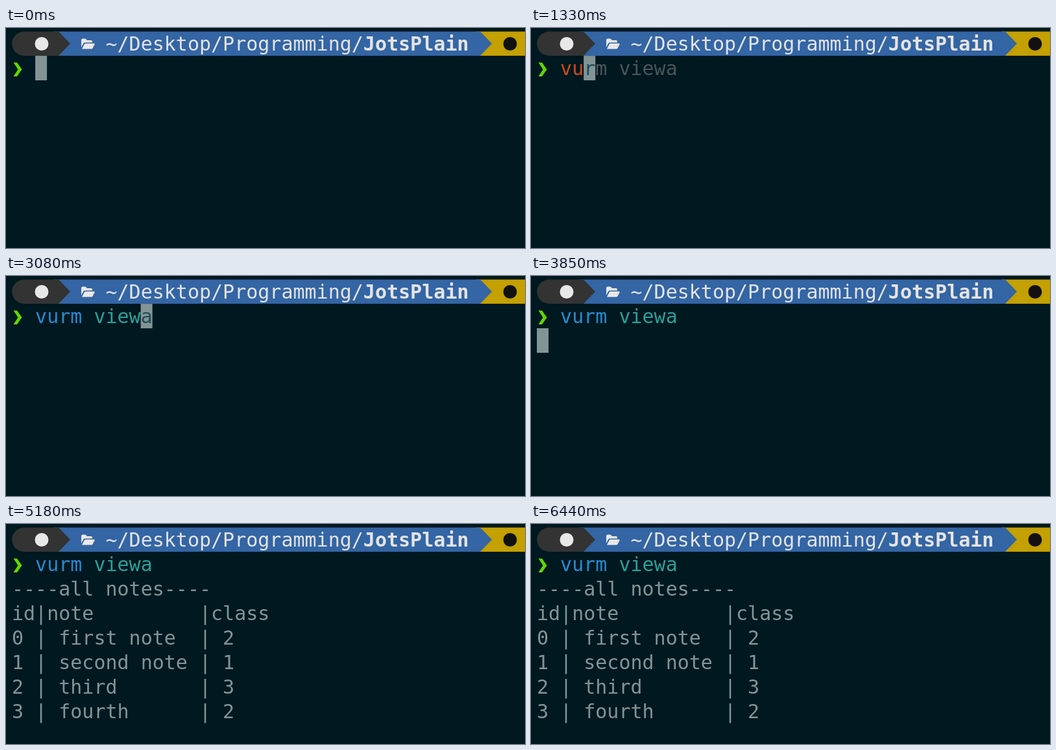
These frames come from a looping animation (800x341 px, 6.51 s). An HTML page:

```html
<!DOCTYPE html>
<html lang="en">
<head>
<meta charset="utf-8">
<title>Terminal notes</title>
<style>
  html, body { margin: 0; width: 100%; height: 100%; overflow: hidden; background: #001820; }
  svg { display: block; width: 800px; height: 341px; }
  text { font: 30px "DejaVu Sans Mono", monospace; white-space: pre; fill: #839496; }
  .path { fill: #e4e4e4; }
  .path tspan { font-weight: bold; }
  #arg { fill: #2aa198; }
  #under { fill: #1f4c57; }
  #hint { fill: #4b5557; }
</style>
</head>
<body>
<svg viewBox="0 0 800 341">
  <!-- prompt bar -->
  <path fill="#c4a000" d="M725 5.500H800V43H725Z"/>
  <path fill="#3465a4" d="M75 5.500H731L749 24.250L731 43H75Z"/>
  <path fill="#333" d="M28 5.500H81L99 24.250L81 43H28A18.750 18.750 0 0 1 28 5.500Z"/>
  <circle cx="55" cy="24.500" r="10.500" fill="#e8e8e8"/>
  <path fill="#e8e8e8" d="M116 30V18.500Q116 16.500 118 16.500H122.500L125 19H131Q133 19 133 21V22.500H122Q120 22.500 119 24ZM117 32.500L120.500 25.500Q121.200 24 122.500 24H136Q137.300 24 136.700 25.200L133.500 31.200Q132.800 32.500 131.500 32.500Z"/>
  <text class="path" x="153.500" y="35">~/Desktop/Programming/<tspan>JotsPlain</tspan></text>
  <circle cx="777" cy="24.500" r="10.500" fill="#111"/>

  <!-- command line -->
  <path fill="#5fd700" d="M11.500 53.500H17L24.500 64.300L17 75H11.500L18.500 64.300Z"/>
  <rect id="cursor" width="18" height="38" fill="#839496"/>
  <text x="45.100" y="73"><tspan id="cmd"></tspan><tspan id="arg"></tspan><tspan id="under"></tspan><tspan id="hint"></tspan></text>
  <g id="output"></g>
</svg>
<script>
const LOOP = 6510, CELL = 18.06, ROW = 37.9, LEFT = 9, TOP = 5.2;
const COMMAND = "vurm", LINE = COMMAND + " viewa";
const KEYS = [1050, 1260, 1540, 1750, 2030, 2310, 2520, 2730, 2940, 3220];
const ENTER = 3570, PRINT = 4130;
const NOTES = [["first note", 2], ["second note", 1], ["third", 3], ["fourth", 2]];

const $ = id => document.getElementById(id);
const [cursor, cmd, arg, under, hint, output] =
  ["cursor", "cmd", "arg", "under", "hint", "output"].map($);

const rows = [
  "----all notes----",
  "id|" + "note".padEnd(13) + "|class",
  ...NOTES.map(([note, kind], id) => `${id} | ${note.padEnd(12)}| ${kind}`)
];
output.innerHTML = rows.map((row, i) =>
  `<text x="${LEFT}" y="${35.2 + ROW * (i + 2)}">${row}</text>`).join("");

function draw(t) {
  const typed = KEYS.filter(key => t >= key).length;
  const entered = t >= ENTER, printed = t >= PRINT;
  const size = COMMAND.length;

  cmd.textContent = LINE.slice(0, Math.min(typed, size));
  cmd.style.fill = typed < size ? "#cb4b16" : "#268bd2";
  arg.textContent = LINE.slice(size, Math.max(typed, size));

  // the suggestion shows once the first letter is typed
  const rest = typed ? LINE.slice(typed) : "";
  under.textContent = rest.slice(0, 1);
  hint.textContent = rest.slice(1);

  cursor.setAttribute("x", LEFT + (entered ? 0 : (2 + typed) * CELL));
  cursor.setAttribute("y", TOP + ROW * (entered ? 2 : 1));
  cursor.style.display = printed ? "none" : "";
  output.style.display = printed ? "" : "none";
}

const start = performance.now();
function tick() {
  draw((performance.now() - start) % LOOP);
  requestAnimationFrame(tick);
}
tick();
</script>
</body>
</html>
```
